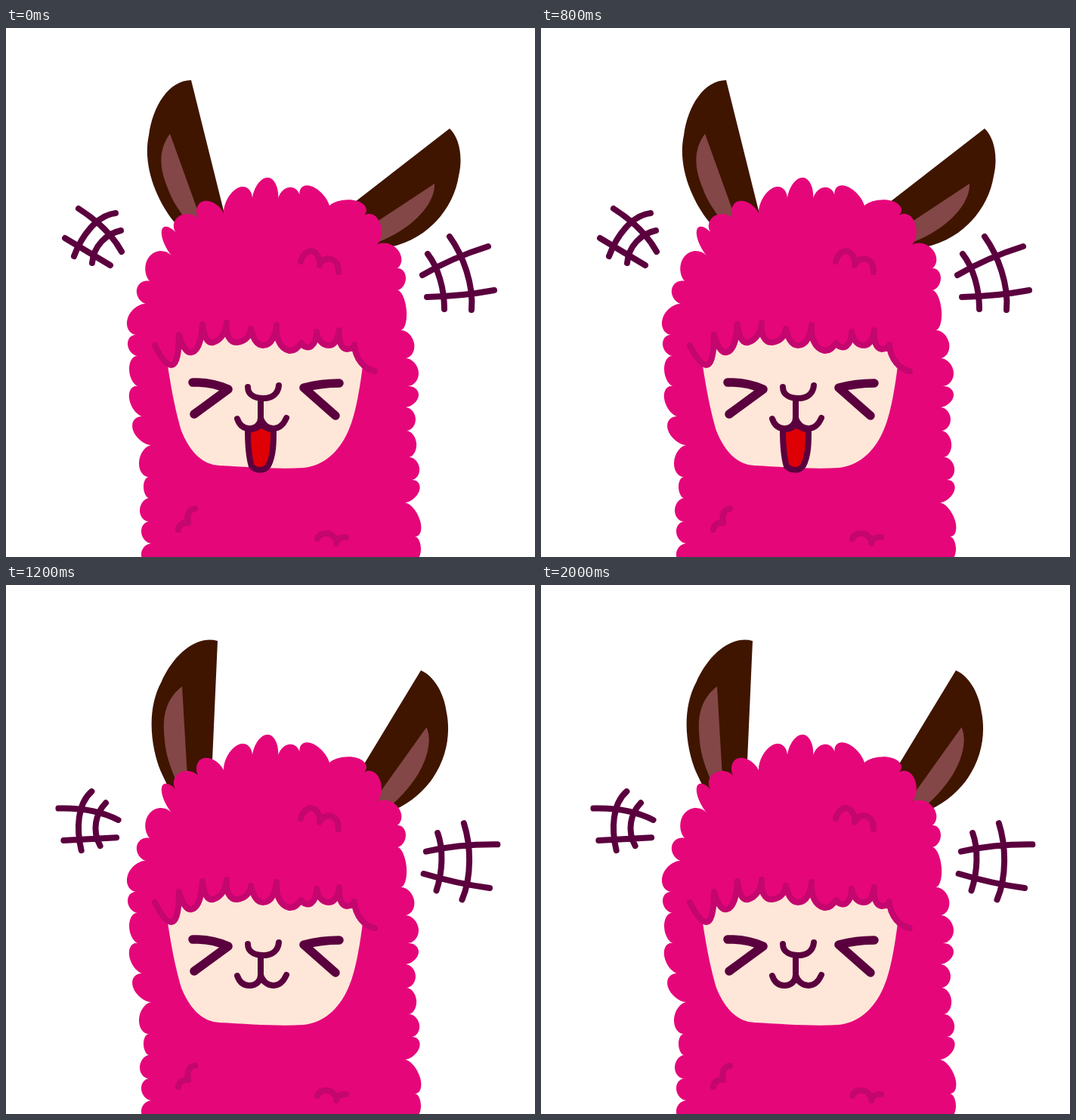
An HTML page that plays this animation: 700 px wide and 700 px high, repeating every 2400 ms.

```html
<!DOCTYPE html>
<html lang="en">
<head>
<meta charset="utf-8">
<title>Laughing alpaca</title>
<style>
  html, body { margin: 0; height: 100%; overflow: hidden; background: #fff; }
  svg { display: block; width: 100vw; height: 100vh; }
  .line { fill: none; stroke: #5b003e; stroke-width: 8; stroke-linecap: round; stroke-linejoin: round; }
  .curl { stroke: #c4066f; }
  .eye { stroke-width: 11.5; }
  .outer { fill: #3f1500; }
  .inner { fill: #834747; }
</style>
</head>
<body>
<svg viewBox="0 0 700 700">
  <g id="leftEar">
    <path class="outer" d="M245 69C216 69 194 103 189 142C180 184 201 230 222 256L240 276L295 270Z"/>
    <path class="inner" d="M217 140C200 163 204 188 214 212C219 226 226 238 240 256L246 264L261 262Z"/>
  </g>
  <g id="rightEar">
    <path class="outer" d="M587 133C600 145 605 171 599 196C592 240 555 288 488 293L440 247Z"/>
    <path class="inner" d="M567 206C568 228 548 250 530 263C516 273 500 281 480 288L470 270Z"/>
  </g>
  <path id="wool" fill="#e5067a"/>
  <path id="face" fill="#fee6d8"/>
  <path id="fringe" class="line curl"/>
  <path class="line curl" d="M390 309C393 297 403 292 409 297C414 302 416 308 415 314C418 306 427 303 433 307C439 311 440 316 440 323
    M250 636C242 637 239 644 241 655C233 654 228 659 228 664
    M412 676C415 667 427 668 431 671C435 674 438 678 437 682C438 676 444 673 450 674"/>
  <path class="line eye" d="M247 469Q272 468 294 478L249 511M441 470Q417 470 394 476L436 513"/>
  <path id="tongue" class="line" style="fill:#df0006"
    d="M320 532C320 548 321 567 325 580C331 586 342 587 347 579C354 566 354 548 354 532Q343 530 338 524Q332 531 320 532Z"/>
  <path class="line" d="M320 475C320 486 330 490 341 490C353 490 360 483 361 473M337 490V518
    M306 517C309 526 315 530 322 530C331 530 337 524 337 516C339 524 346 530 354 530C361 530 367 525 371 516"/>
  <path id="leftMarks" class="line" d="M96 239C118 253 140 272 153 296M145 245C120 248 100 275 90 302
    M78 278L138 314M152 268C133 272 116 288 114 311"/>
  <path id="rightMarks" class="line" d="M558 299C572 317 580 345 580 372M587 276C605 301 619 340 616 373
    M551 327Q590 304 638 289M557 356Q603 355 646 347"/>
</svg>
<script>
const el = id => document.getElementById(id);

// Alternating notch and tuft-tip points, clockwise from the lower left.
const leftFlank = [[195,712],[179,698],[192,682],[179,667],[190,653],[177,639],[189,622],[182,606],
  [190,594],[176,575],[192,552],[168,532],[180,514],[163,490],[175,474],[163,452],[174,434],
  [161,419],[172,406],[161,384],[185,365],[173,346],[190,335],[190,302]];
const crown = [[219,301],[206,268],[225,271],[229,249],[254,252],[262,229],[288,245],[306,212],
  [326,225],[347,198],[360,229],[374,211],[389,224],[403,209],[428,235],[465,229],[473,249],
  [494,256]];
const rightFlank = [[491,287],[518,293],[518,318],[529,331],[518,347],[530,374],[522,400],[540,417],
  [529,437],[546,456],[531,474],[546,486],[529,502],[542,518],[529,533],[543,549],[533,568],
  [547,582],[537,598],[547,612],[528,628],[548,652],[541,673],[549,690],[540,706]];

function tufts(points) {
  let d = `M${points[0]}`;
  for (let i = 0; i + 2 < points.length; i += 2) {
    const [[ax, ay], [tx, ty], [bx, by]] = points.slice(i, i + 3);
    const cx = (bx - ax) * 0.28, cy = (by - ay) * 0.28;
    const rx = (tx - (ax + bx) / 2) * 0.5, ry = (ty - (ay + by) / 2) * 0.5;
    d += `C${ax + rx} ${ay + ry} ${tx - cx} ${ty - cy} ${tx} ${ty}`
       + `C${tx + cx} ${ty + cy} ${bx + rx} ${by + ry} ${bx} ${by}`;
  }
  return d + "Z";
}

const scallops = "C228 446 229 420 229 406C233 422 240 431 246 429C257 426 259 405 260 392"
  + "C262 408 266 418 274 416C285 413 291 402 292 390C290 405 296 417 306 416"
  + "C318 415 324 405 324 398C327 410 331 420 340 420C352 420 357 405 358 393"
  + "C357 410 362 424 375 427C383 428 388 420 391 417C393 422 400 424 404 421"
  + "C410 416 411 408 411 402C413 412 418 420 427 420C436 420 440 409 441 400"
  + "C440 414 443 424 451 425C457 425 461 421 461 419";

el("wool").setAttribute("d", tufts([...leftFlank, ...crown, ...rightFlank]));
el("fringe").setAttribute("d", `M197 420C204 434 212 446 219 446${scallops}C462 438 475 452 488 454`);
el("face").setAttribute("d", `M219 446${scallops}C463 430 468 440 472 447C467 487 461 515 453 533`
  + "C440 563 418 580 393 582C360 584 320 581 283 579C256 578 241 555 232 533C225 510 219 480 214 447Z");

// Transforms for the closed-mouth pose; the other pose is drawn untransformed.
const closedPose = {
  leftEar: "rotate(16.5 245 192.3)",
  rightEar: "rotate(-21 514 225.6)",
  leftMarks: "translate(-7 35.4) rotate(-34 120.8 281.6)",
  rightMarks: "translate(2 38) rotate(18 591.6 329.9)"
};
const POSE_MS = 400;

function render(now) {
  const closed = Math.floor(now / POSE_MS) % 2 === 1;
  for (const id in closedPose) el(id).setAttribute("transform", closed ? closedPose[id] : "");
  el("tongue").setAttribute("visibility", closed ? "hidden" : "visible");
  requestAnimationFrame(render);
}
render(performance.now());
</script>
</body>
</html>
```
